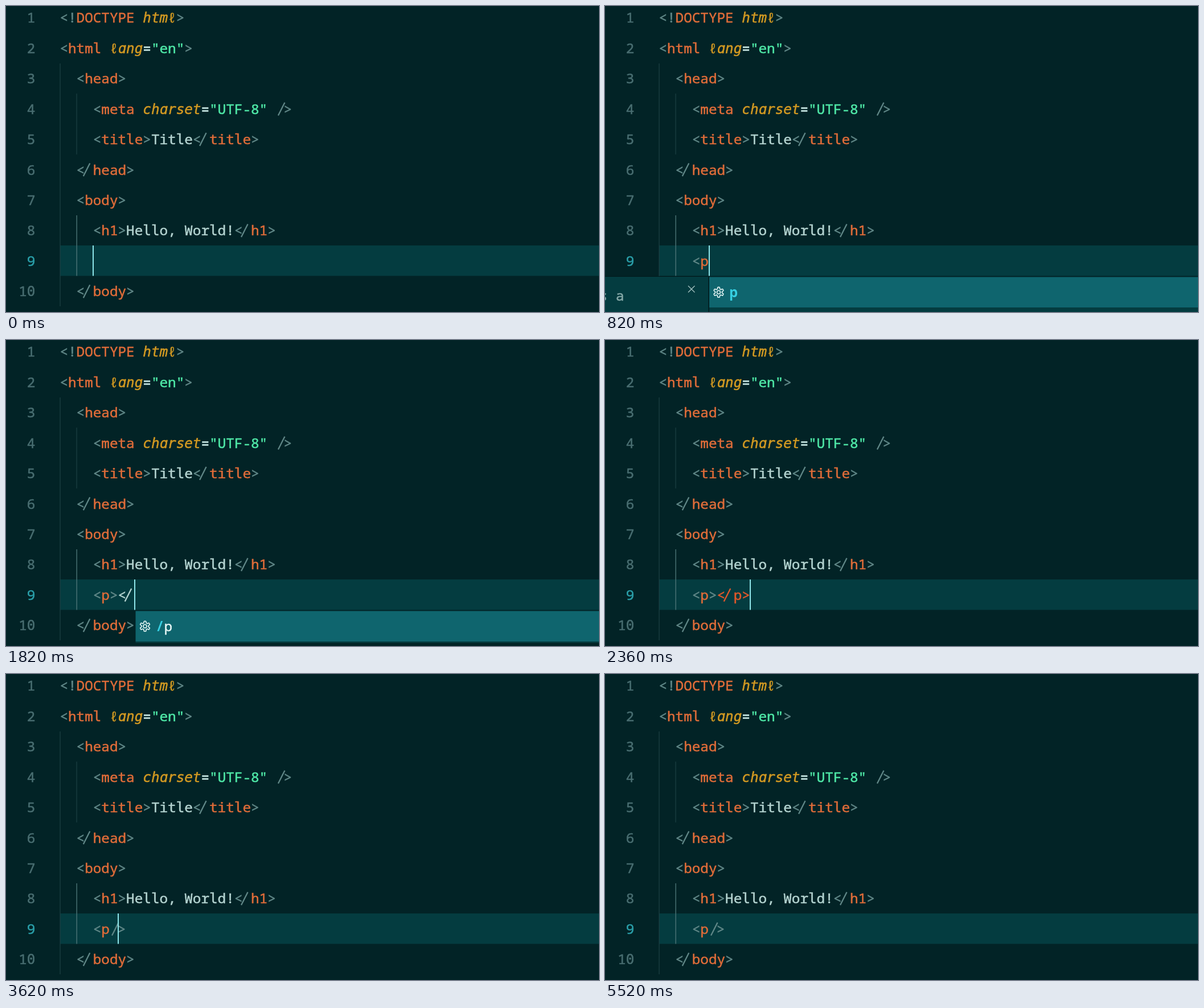
An HTML page with a canvas that plays this animation: 1041x538 px, repeating every 5580 ms.

```html
<!DOCTYPE html>
<html lang="en">
<head>
<meta charset="utf-8">
<title>Typing a paragraph tag</title>
<style>
html, body { margin: 0; width: 100%; height: 100%; overflow: hidden; background: #022326; }
canvas { display: block; }
</style>
</head>
<body>
<canvas id="stage" width="1041" height="538"></canvas>
<script>
const ctx = document.getElementById('stage').getContext('2d');
const LOOP = 5580, CELL = 14.59, LEFT = 95, ROW = 53.45, BASE = 29.3;
const BG = '#022326', LINE = '#043c40', SELECTED = '#0f656e';
const COLORS = {
  g: '#608787', o: '#df6c39', y: '#d29922', s: '#4fe8a7',
  w: '#b4d3d0', b: '#b4d3d0', r: '#e2582a', c: '#36cfe2', h: '#e6f6f5',
  n: '#486d70', a: '#2a9fa9', d: '#86a9a8'
};
const SCRIPT = { l: 'ℓ', a: 'ɑ' };  // cursive letterforms

// Each run is a colour key followed by its text; runs are split by "|".
const LINES = [
  [0, 'g<!|oDOCTYPE|y html|g>'],
  [0, 'g<|ohtml|y lang|b=|s"en"|g>'],
  [2, 'g<|ohead|g>'],
  [4, 'g<|ometa|y charset|b=|s"UTF-8"|g />'],
  [4, 'g<|otitle|g>|wTitle|g</|otitle|g>'],
  [2, 'g</|ohead|g>'],
  [2, 'g<|obody|g>'],
  [4, 'g<|oh1|g>|wHello, World!|g</|oh1|g>'],
  null,
  [2, 'g</|obody|g>']
];

const TAG = 'g<|op|g>';
// [time, text of line 9, caret column]
const EDITS = [
  [0, '', 4],
  [20, 'r<', 5],
  [60, 'w<', 5],
  [480, 'g<|op', 6],
  [1040, TAG, 7],
  [1540, TAG + '|r<', 8],
  [1580, TAG + '|w<', 8],
  [1760, TAG + '|w</', 9],
  [2360, TAG + '|r</p>', 11],
  [2400, TAG + '|g</|op|g>', 11],
  [2740, TAG + '|g</|op', 10],
  [2880, TAG + '|w</', 9],
  [3000, TAG + '|w<', 8],
  [3120, TAG, 7],
  [3300, TAG, 6],
  [3500, 'g<|op|g/>', 7],
  [4700, 'g<|op|g/>', null]
];

function rect(x, y, w, h, color) {
  ctx.fillStyle = color;
  ctx.fillRect(x, y, w, h);
}

function glyph(ch, key, x, y) {
  const script = key === 'y';
  const rounded = script || 'l0'.includes(ch);
  const style = script && ch !== 'l' ? 'italic ' : '';
  const weight = 'bc'.includes(key) ? 700 : 400;
  ctx.font = `${style}${weight} 24.3px ${rounded ? '"DejaVu Sans Mono"' : '"Noto Sans Mono"'}, monospace`;
  ctx.fillStyle = ctx.strokeStyle = COLORS[key];
  ctx.lineWidth = 0.55;
  const shape = script && SCRIPT[ch] || ch;
  ctx.fillText(shape, x, y);
  if (weight === 400) ctx.strokeText(shape, x, y);
}

// The long slash used in "</" and "/>"
function slash(key, x, y) {
  ctx.beginPath();
  ctx.moveTo(x + 1, y + 2.8);
  ctx.lineTo(x + 12.5, y - 20);
  ctx.strokeStyle = COLORS[key];
  ctx.lineWidth = 2.3;
  ctx.stroke();
}

function text(code, x, y) {
  const cells = code.split('|').flatMap(run => [...run.slice(1)].map(ch => [ch, run[0]]));
  cells.forEach(([ch, key], i) => {
    const prev = i ? cells[i - 1][0] : '', next = i + 1 < cells.length ? cells[i + 1][0] : '';
    const left = x + i * CELL;
    if (ch === '/' && prev === '<') slash(key, left - 4, y);
    else if (ch === '/' && next === '>') slash(key, left + 2.5, y);
    else glyph(ch, key, left - (ch === '>' && prev === '/' ? 1.5 : 0.6), y);
  });
}

const codeLine = (row, col, code) => text(code, LEFT + col * CELL, BASE + row * ROW);

function gear(x, y) {
  ctx.beginPath();
  for (let i = 0; i <= 96; i++) {
    const a = i / 96 * Math.PI * 2;
    const r = 7.5 + 1.5 * Math.tanh(3 * Math.cos(6 * a));
    ctx.lineTo(x + r * Math.sin(a), y - r * Math.cos(a));
  }
  ctx.closePath();
  ctx.moveTo(x + 3, y);
  ctx.arc(x, y, 3, 0, Math.PI * 2);
  ctx.strokeStyle = COLORS.h;
  ctx.lineWidth = 1.6;
  ctx.stroke();
}

function popup(x, label) {
  rect(x - 1, 475, 1042 - x, 63, BG);
  rect(x, 476.5, 1041 - x, 53.5, SELECTED);
  gear(x + 16.5, 503.3);
  text(label, x + 36, 512.3);
}

function details() {
  rect(0, 475, 183, 63, '#01181a');
  rect(0, 476, 181.5, 62, LINE);
  text('ds a', -9.7, 518.3);
  ctx.beginPath();
  ctx.moveTo(146, 492);
  ctx.lineTo(157.5, 503.5);
  ctx.moveTo(157.5, 492);
  ctx.lineTo(146, 503.5);
  ctx.strokeStyle = '#a5c3c2';
  ctx.lineWidth = 1.3;
  ctx.stroke();
}

function draw(now) {
  const t = now % LOOP;
  const [, code, caret] = EDITS.findLast(e => e[0] <= t);

  rect(0, 0, 1041, 538, BG);
  rect(LEFT, 421, 946, 53.5, LINE);
  rect(94.5, 101, 1.2, 427, '#1d4144');
  rect(123.5, 154, 1.2, 107, '#1d4144');
  rect(123.5, 368, 1.4, 106.5, '#4d7577');

  LINES.forEach((line, i) => {
    const n = String(i + 1);
    text((i === 8 ? 'a' : 'n') + n, 52 - n.length * CELL, BASE + i * ROW);
    if (line) codeLine(i, ...line);
  });
  codeLine(8, 4, code);
  if (caret !== null) rect(Math.round(LEFT + caret * CELL) - 1, 421, 2, 53.5, '#8fe6ea');

  if (t >= 500 && t < 1040) {
    popup(183, 'cp');
    rect(183, 530, 858, 8, LINE);
    if (t >= 800) details();
  }
  if (t >= 1780 && t < 2360) {
    popup(227.5, 'c/|hp');
    rect(227.5, 530, 814, 2.5, LINE);
  }
}

function frame() {
  draw(performance.now());
  requestAnimationFrame(frame);
}
frame();
</script>
</body>
</html>
```
